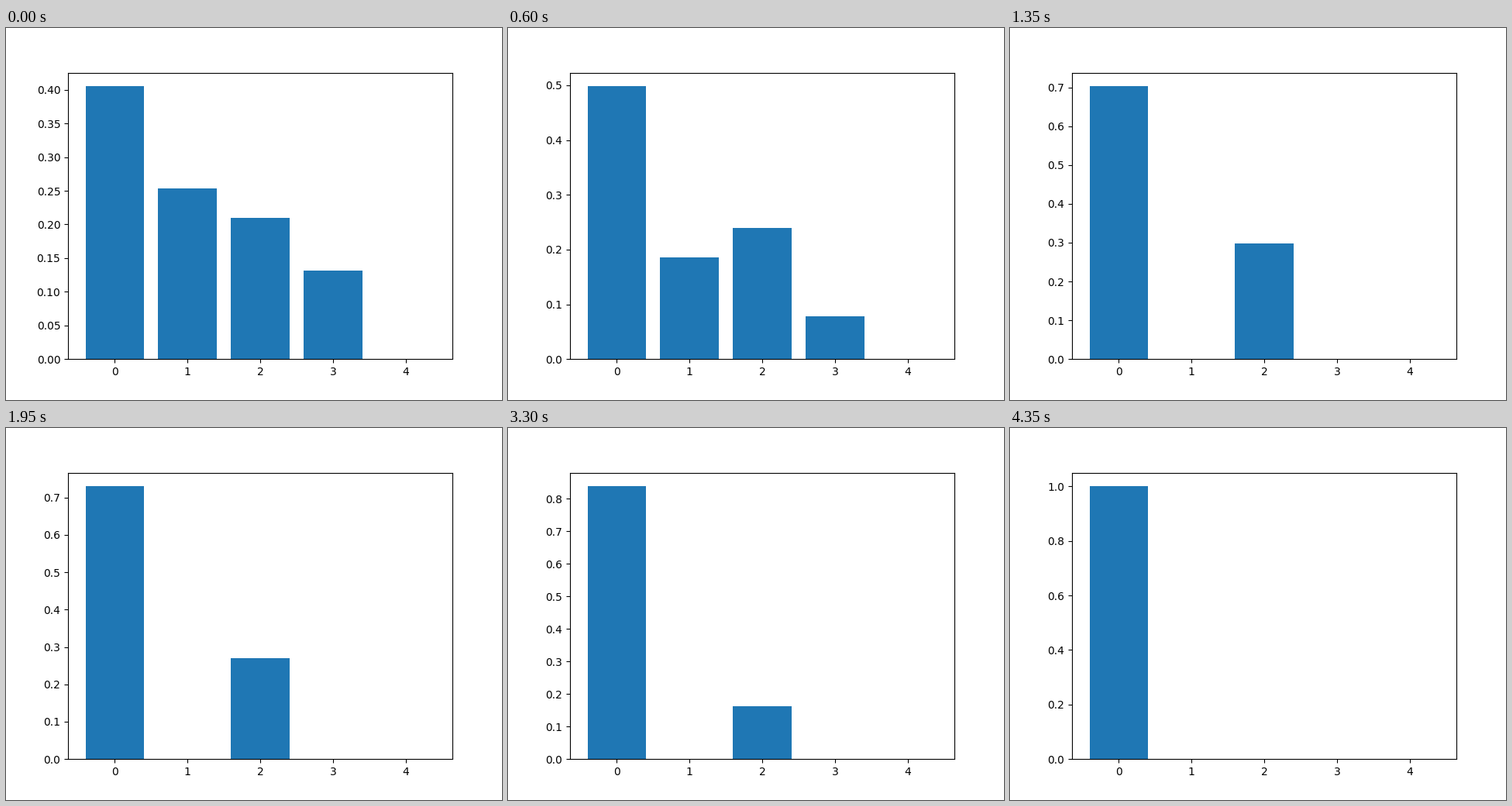
A matplotlib script for the animation above (8000 ms loop, 640x480 px).

```python
import matplotlib.pyplot as plt
import numpy as np
from matplotlib.animation import FuncAnimation

INTERVAL = 50
FRAMES = 160
FRAMES_PER_STEP = 3
LAST_STEP = 29

CENTER = np.array([0.3147, 0.3214, 0.1813, 0.1845, 0.0])
DRIFT = np.array([0.0910, -0.0676, 0.0287, -0.0529, 0.0])


def distribution(step):
    """Probabilities drifting away from an unstable mix towards one choice."""
    if step <= 8:
        p = CENTER + DRIFT * 1.1917 ** step
    else:
        share = 0.3637 - 0.0935 * 1.0895 ** (step - 13)
        share = max(share, 0)
        p = np.array([1 - share, 0, share, 0, 0])
    p = np.clip(p, 0, None)
    return p / p.sum()


plt.rcParams["font.family"] = "DejaVu Sans"
fig, ax = plt.subplots(figsize=(6.4, 4.8), dpi=100)


def draw(frame):
    step = min(frame // FRAMES_PER_STEP, LAST_STEP)
    ax.clear()
    return ax.bar(range(5), distribution(step), color="#1f77b4").patches


anim = FuncAnimation(fig, draw, frames=FRAMES, init_func=lambda: draw(0),
                     interval=INTERVAL, repeat=True, repeat_delay=0)
plt.show()
```
